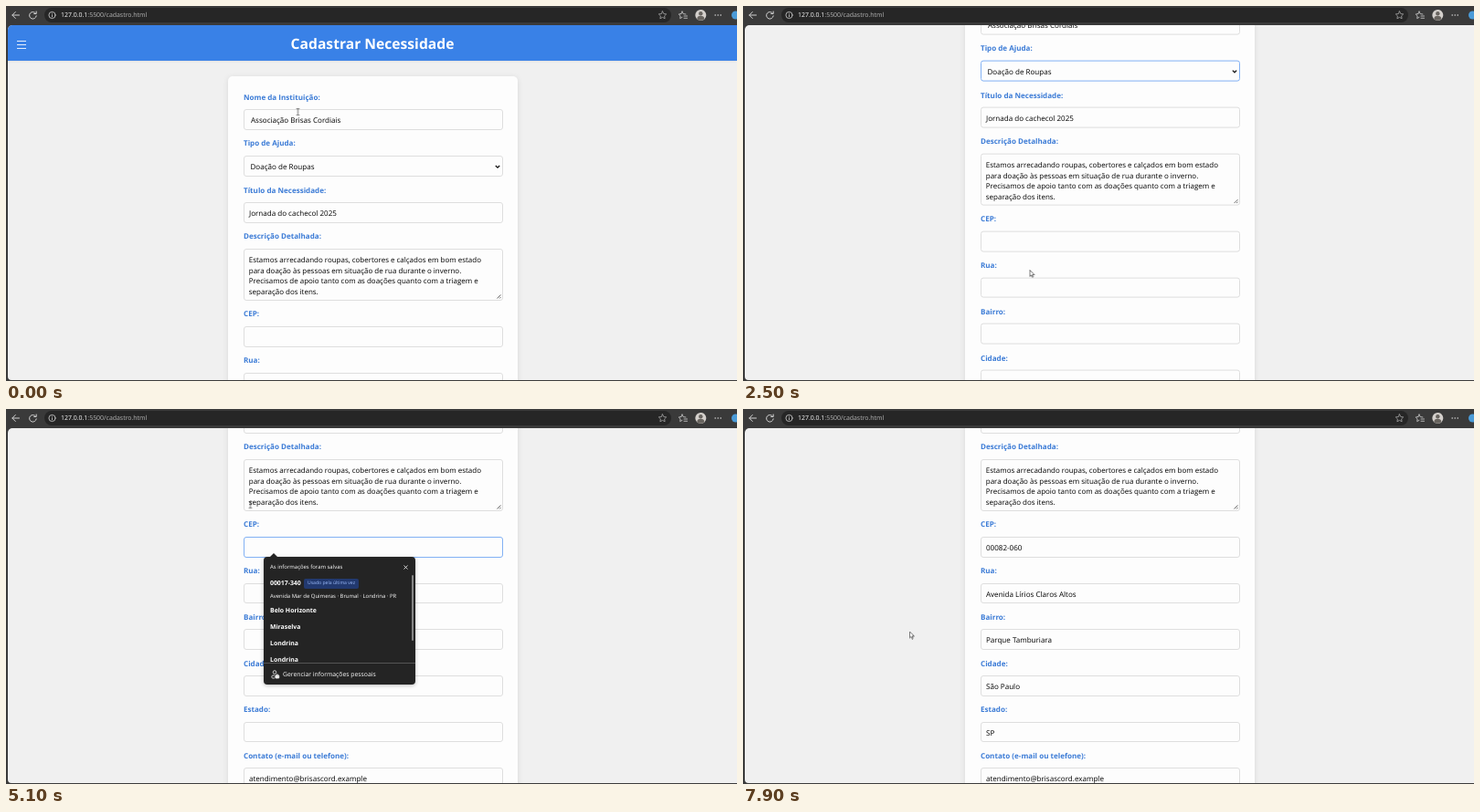
Animation of 800 by 411 pixels, one loop 8000 ms. Source, as an HTML page:

```html
<!DOCTYPE html>
<html lang="pt-BR">
<head>
<meta charset="utf-8">
<title>Cadastrar Necessidade</title>
<style>
* { box-sizing: border-box; }
html, body { margin: 0; width: 100%; height: 100%; overflow: hidden; }
body {
  position: relative; background: #3a3a3a; color: #000;
  font: 8.05px/14px "Open Sans", "Noto Sans", sans-serif;
  text-rendering: geometricPrecision; white-space: nowrap;
}
.abs, .bar, .view, .doc, .pop, .menu, .cursor { position: absolute; }

/* browser bar */
.bar { left: 0; top: 0; }
.url { left: 60px; top: 4px; font-size: 6.95px; line-height: 13px; color: #b8b8b8; }
.url b { font-weight: 400; color: #fff; }

/* page */
.view { left: 2px; top: 21px; width: 798px; height: 389px; overflow: hidden; background: #f0f0f0; border-radius: 5px 0 0 4px; }
.doc { left: -2px; top: -21px; width: 800px; height: 660px; animation: scroll 8s linear infinite; }
header {
  position: absolute; left: 2px; top: 21px; width: 798px; height: 39px; background: #3981e7;
  box-shadow: 0 1px 2px #0001; color: #fff; text-align: center; font: 700 15.65px/40px "Open Sans", "Noto Sans", sans-serif;
}
header i { position: absolute; left: 9.5px; width: 10px; height: 1px; background: #fffd; }
.card { left: 243px; top: 77px; width: 317px; height: 600px; padding: 16px 16.5px 0 17px; background: #fdfdfd; border-radius: 5px; box-shadow: 0 1px 6px #0000001a; }
label { display: block; height: 20px; padding-top: .6px; font-weight: 700; color: #3b7bd6; }
.in {
  position: relative; height: 22.7px; margin-bottom: 8px; padding: 1px 0 0 5px; line-height: 21.5px;
  border: 1px solid #dedede; border-radius: 3px; background: #fdfdfd;
}
.pad { padding-left: 7px; }
.sel { height: 23.5px; padding-left: 6.5px; animation: sel-focus 8s step-end infinite; }
.area { height: 57px; padding: 6.5px 0 0 4.8px; font-size: 7.97px; line-height: 11.45px; }
.in svg { position: absolute; }
.cep { animation: cep-focus 8s step-end infinite; }
.cep span { animation: cep-text 8s step-end infinite; }
.caret { display: inline-block; width: .8px; height: 11px; background: #555; vertical-align: -2.5px; animation: caret-end 8s step-end infinite; }
.caret.first { position: absolute; left: 4.6px; top: 5.5px; animation-name: caret-start; }
.fill { animation: fill 8s step-end infinite; }

/* select list */
.menu { left: 260.5px; top: 189.5px; width: 282.5px; height: 110px; overflow: hidden; border: .6px solid #bbb; border-radius: 3px; background: #fdfdfd; }
.drop { animation: menu 8s step-end infinite; filter: drop-shadow(0 2px 4px #0005); }
.list { left: 0; top: .6px; width: 100%; line-height: 15.6px; }
.list div { padding-left: 7px; height: 15.6px; }
.hot { background: #6f6f6f; color: #fff; animation: hover 8s step-end infinite; }

/* saved data */
.pop { left: 282px; top: 162px; width: 166px; height: 140px; background: #242424; color: #fff; border-radius: 4px; box-shadow: 0 1px 4px #0004; animation: pop 8s step-end infinite; }
.pop::before { content: ""; position: absolute; left: 7px; top: -4px; border: 4px solid transparent; border-top: 0; border-bottom-color: #242424; }
.pop b { position: absolute; left: 7px; font-size: 6.9px; }
.small { left: 7px; font-size: 5.95px; color: #fff; }
.badge { left: 44px; top: 24px; width: 60px; height: 10.5px; border-radius: 2px; background: #22396f; color: #9dbdfb; font-size: 5.1px; line-height: 10.5px; text-align: center; }
.saved { left: 0; top: 0; width: 160px; height: 114.5px; overflow: hidden; }
.thumb { left: 161.5px; top: 20px; width: 2px; height: 72px; border-radius: 1px; background: #858585; }
.foot { left: 0; top: 116px; width: 166px; height: 24px; border-top: .7px solid #555; padding-left: 21px; line-height: 25px; font-size: 6.83px; }
.foot svg { position: absolute; left: 8px; top: 7px; }

/* pointer */
.cursor { left: 0; top: 0; overflow: visible; animation: move 8s ease-in-out infinite; }
.beam { animation: beam 8s step-end infinite; }
.arrow { animation: arrow 8s step-end infinite; }

@keyframes scroll {
  0%, 28% { transform: translateY(0); }
  31.5% { transform: translateY(-112px); }
  34% { transform: translateY(-178px); }
  36.25% { transform: translateY(-204px); }
  38%, 100% { transform: translateY(-211px); }
}
@keyframes move {
  0%, 3.5% { transform: translate(319.5px, 116px); }
  8.5%, 10% { transform: translate(430px, 176px); }
  12.5% { transform: translate(380px, 215px); }
  16.25% { transform: translate(300px, 291px); }
  18.5% { transform: translate(262px, 286px); }
  22%, 25.5% { transform: translate(184.5px, 229.5px); }
  28%, 37.5% { transform: translate(313.5px, 289px); }
  42.5%, 50% { transform: translate(291.3px, 149px); }
  55%, 76% { transform: translate(267.5px, 105px); }
  83%, 100% { transform: translate(182px, 243.5px); }
}
@keyframes beam { 0% { opacity: 1; } 5% { opacity: 0; } 41.5% { opacity: 1; } 78% { opacity: 0; } }
@keyframes arrow { 0% { opacity: 0; } 5% { opacity: 1; } 41.5% { opacity: 0; } 78% { opacity: 1; } }
@keyframes sel-focus { 0% { border-color: #dedede; } 9% { border-color: #82b1f4; } 44.3% { border-color: #dedede; } }
@keyframes cep-focus { 0% { border-color: #dedede; } 44.3% { border-color: #82b1f4; } 85% { border-color: #dedede; } }
@keyframes menu { 0% { opacity: 0; } 10% { opacity: 1; } 25.6% { opacity: 0; } }
@keyframes hover {
  0% { clip-path: inset(78px 0 15.6px); }
  12% { clip-path: inset(15.6px 0 78px); }
  13.5% { clip-path: inset(31.2px 0 62.4px); }
  14.2% { clip-path: inset(46.8px 0 46.8px); }
  14.8% { clip-path: inset(62.4px 0 31.2px); }
  15.4% { clip-path: inset(78px 0 15.6px); }
  16% { clip-path: inset(93.6px 0 0); }
}
@keyframes pop { 0% { opacity: 0; } 45% { opacity: 1; } 65.6% { opacity: 0; } }
@keyframes caret-start { 0% { opacity: 0; } 44.3% { opacity: 1; } 50.6% { opacity: 0; } 56.8% { opacity: 1; } 63.1% { opacity: 0; } }
@keyframes cep-text { 0% { opacity: 0; } 65.6% { opacity: 1; } }
@keyframes caret-end { 0% { opacity: 0; } 65.6% { opacity: 1; } 71.8% { opacity: 0; } 78.1% { opacity: 1; } 84.3% { opacity: 0; } }
@keyframes fill { 0% { opacity: 0; } 88.7% { opacity: 1; } }
</style>
</head>
<body>
<svg class="bar" width="800" height="21" fill="none" stroke="#d2d2d2" stroke-width="1" stroke-linecap="round" stroke-linejoin="round">
  <rect x="42" y="2" width="686" height="16" rx="8" fill="#262626" stroke="none"/>
  <path d="M14.5 10H7M10.3 6.5 6.8 10l3.5 3.5"/>
  <path d="M32.6 8.2A3.8 3.8 0 1 0 33.2 10.8M33.2 6v2.5h-2.5"/>
  <g stroke-width=".8">
    <circle cx="50.5" cy="10" r="3.6"/><path d="M50.5 9.8v2M50.5 8.1v.1"/>
    <path d="m718.5 5.8 1.3 2.7 2.9.4-2.1 2 .5 2.9-2.6-1.4-2.6 1.4.5-2.9-2.1-2 2.9-.4z" stroke="#a8a8a8"/>
    <path d="m740 6 1.2 2.6 2.7.4M738.8 8.6 736.2 9l1.9 1.9-.4 2.7 2.3-1.2M740 6l-1.2 2.6M742 11h3.5M742 13.3h3.5"/>
  </g>
  <g stroke="none">
    <circle cx="760.3" cy="10" r="6" fill="#d4d0cc"/>
    <circle cx="760.3" cy="8.3" r="2.2" fill="#68645f"/>
    <path d="M756.3 14.2a4 3.4 0 0 1 8 0 6 6 0 0 1-8 0z" fill="#68645f"/>
    <g fill="#d2d2d2"><circle cx="776.2" cy="10" r=".8"/><circle cx="779.2" cy="10" r=".8"/><circle cx="782.2" cy="10" r=".8"/></g>
    <circle cx="798.5" cy="10" r="4.5" fill="#4a9bd8"/>
  </g>
</svg>
<div class="abs url"><b>127.0.0.1</b>:5500/cadastro.html</div>

<main class="view">
  <div class="doc">
    <header>Cadastrar Necessidade
      <i style="top:17px"></i><i style="top:21px"></i><i style="top:25px"></i>
    </header>
    <div class="abs card">
      <label>Nome da Instituição:</label><div class="in pad">Associação Brisas Cordiais</div>
      <label>Tipo de Ajuda:</label>
      <div class="in sel">Doação de Roupas
        <svg style="right:1.5px;top:9px" width="6" height="5" fill="none" stroke="#111" stroke-width="1.3"><path d="m.8 1 2.2 2.2L5.2 1"/></svg>
      </div>
      <label>Título da Necessidade:</label><div class="in">Jornada do cachecol 2025</div>
      <label>Descrição Detalhada:</label>
      <div class="in area">Estamos arrecadando roupas, cobertores e calçados em bom estado<br>para doação às pessoas em situação de rua durante o inverno.<br>Precisamos de apoio tanto com as doações quanto com a triagem e<br>separação dos itens.
        <svg style="right:.5px;bottom:.5px" width="5" height="5" stroke="#444" stroke-width=".8"><path d="M.5 4.5l4-4M3 4.5 4.5 3"/></svg>
      </div>
      <label>CEP:</label><div class="in cep"><i class="caret first"></i><span>00082-060</span><i class="caret"></i></div>
      <label>Rua:</label><div class="in"><span class="fill">Avenida Lírios Claros Altos</span></div>
      <label>Bairro:</label><div class="in"><span class="fill">Parque Tamburiara</span></div>
      <label>Cidade:</label><div class="in"><span class="fill">São Paulo</span></div>
      <label>Estado:</label><div class="in"><span class="fill">SP</span></div>
      <label>Contato (e-mail ou telefone):</label><div class="in">atendimento@brisascord.example</div>
    </div>
    <div class="drop">
      <div class="menu">
        <div class="abs list">
          <div>Selecione...</div><div>Educação</div><div>Saúde</div><div>Meio Ambiente</div>
          <div>Doação de Alimentos</div><div>Doação de Roupas</div><div>Outros</div>
        </div>
      </div>
    </div>
  </div>
</main>

<div class="pop">
  <div class="abs small" style="top:4px">As informações foram salvas</div>
  <svg class="abs" style="left:153px;top:8.5px" width="5" height="5" stroke="#fff" stroke-width=".8"><path d="m.5.5 4 4m0-4-4 4"/></svg>
  <div class="abs saved">
    <b style="top:23px">00017-340</b>
    <div class="abs badge">Usado pela última vez</div>
    <div class="abs small" style="top:35.5px">Avenida Mar de Quimeras · Brumal · Londrina · PR</div>
    <b style="top:53px">Belo Horizonte</b>
    <b style="top:71px">Miraselva</b>
    <b style="top:89px">Londrina</b>
    <b style="top:107px">Londrina</b>
  </div>
  <div class="abs thumb"></div>
  <div class="abs foot">
    <svg width="10" height="10" fill="none" stroke="#eee" stroke-width=".8"><circle cx="4" cy="2.5" r="1.8"/><path d="M4 9H1.8Q.6 9 .8 7.2 1 6 2 6h2"/><rect x="4.8" y="6" width="4" height="3" rx=".5" fill="#eee"/><path d="M5.8 6V5h2v1"/></svg>
    Gerenciar informações pessoais
  </div>
</div>

<svg class="cursor" width="1" height="1">
  <path class="beam" d="M-1.6-3.5h1.2l.4.4.4-.4h1.2M0-3.2v6.4M-1.6 3.5h1.2l.4-.4.4.4h1.2" fill="none" stroke="#333" stroke-width=".7"/>
  <path class="arrow" d="M.4.4v7l1.6-1.5 1.1 2.4 1.1-.5-1-2.3h2.2z" fill="#fff" stroke="#333" stroke-width=".7" stroke-linejoin="round"/>
</svg>

<script>
// a highlighted copy of the options, clipped to the hovered row
const list = document.querySelector('.list');
const hot = list.cloneNode(true);
hot.classList.add('hot');
list.after(hot);
</script>
</body>
</html>
```
